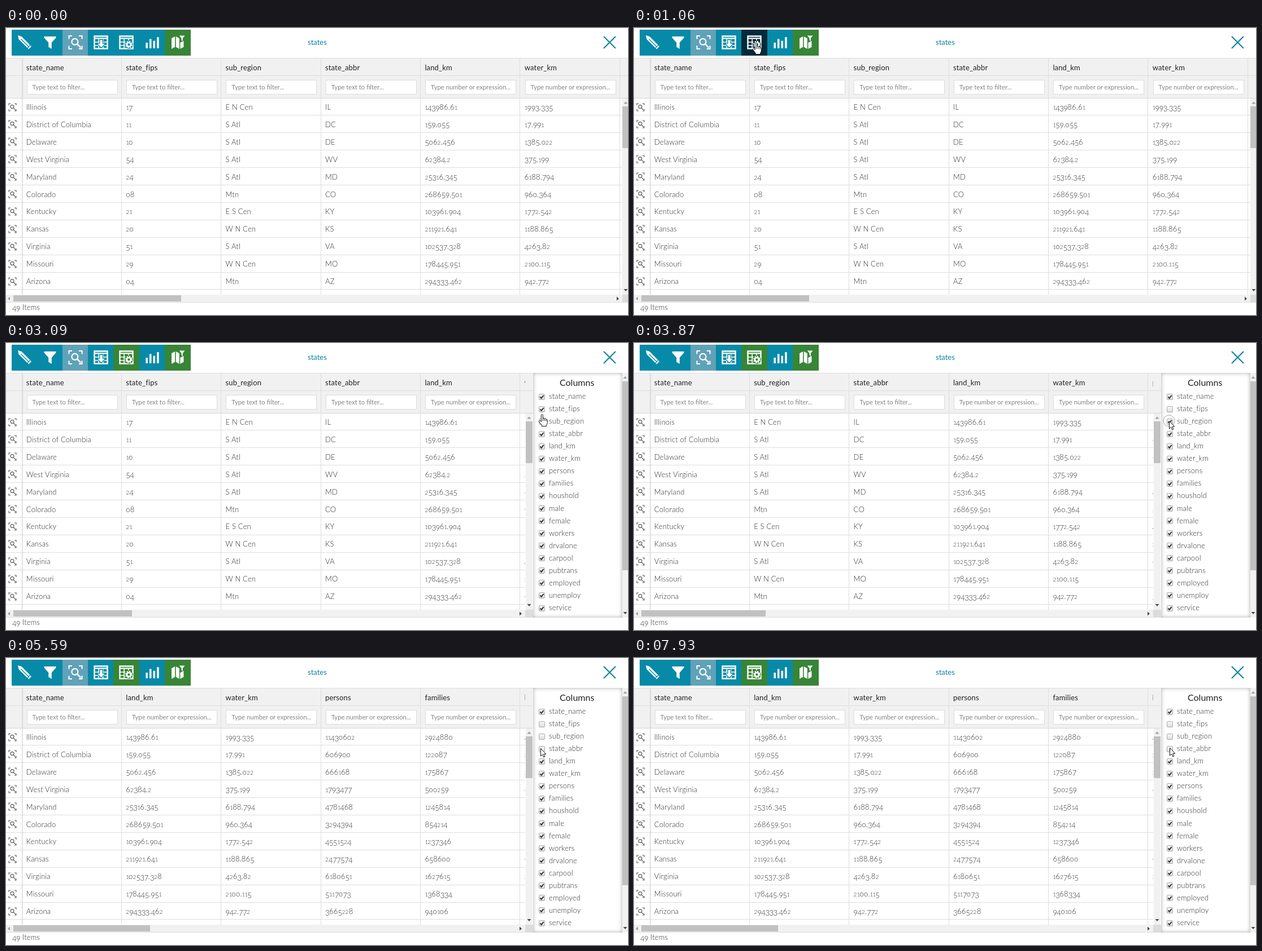
An HTML page for the animation above (8000 ms loop, 1101 by 509 pixels).

```html
<!DOCTYPE html>
<html lang="en">
<head>
<meta charset="utf-8">
<title>states</title>
<style>
html, body { margin: 0; width: 100%; height: 100%; overflow: hidden; background: #fff; }
body { position: relative; font: 13px/31px Lato, "Open Sans", sans-serif; color: #2c2c2c; }
div, svg, i { position: absolute; box-sizing: border-box; white-space: nowrap; }
svg { overflow: visible; fill: none; }
.tool { top: 3px; width: 46px; height: 46px; background: #078aa7; }
.tool svg { left: 0; top: 0; width: 46px; height: 45px; stroke: #fff; stroke-width: 1.9; }
.title { left: 534px; top: 10px; color: #0a82a0; }
#grid { left: 0; top: 53px; width: 1101px; height: 434px; overflow: hidden; border-top: 1px solid #ddd; }
#head { left: 0; top: 0; width: 100%; height: 71px; background: #f1f1f1; border-bottom: 1px solid #d6d6d6; }
#head::after { content: ""; position: absolute; left: 0; top: 30px; width: 100%; height: 1px; background: #ddd; }
#view { left: 0; top: 0; width: 1091px; height: 419px; overflow: hidden; }
.gutter { left: 0; top: 0; width: 29px; height: 419px; border-right: 1px solid #d4d4d4; box-shadow: 1px 0 2px rgba(0, 0, 0, .08); }
.col { top: 0; width: 176.4px; height: 419px; border-right: 1px solid #ddd; }
.col b { position: absolute; left: 7.3px; top: 1px; font-weight: 400; color: #222; letter-spacing: .15px; }
.box { left: 8px; top: 38px; width: 161px; height: 26px; padding-left: 9px; background: #fff; border: 1px solid #dcdcdc;
  font: 11.25px/24px Lato, "Open Sans", sans-serif; color: #858585; }
.cell { left: 7.3px; height: 30.9px; line-height: 31px; }
.cell, .opt, #count { font-weight: 300; letter-spacing: .17px; }
.line { left: 0; width: 100%; height: 1px; background: #dedede; }
.cell span, #count span { line-height: 0; }
.sm { font-size: 10px; letter-spacing: .3px; }
.one { font-size: 10px; letter-spacing: -1px; }
.low { position: relative; top: 2.6px; letter-spacing: -.5px; }
.mark { left: 4px; width: 15px; height: 15px; stroke: #555; stroke-width: 1.1; }
.bar { background: #f1f1f1; }
.bar i { background: #c1c1c1; }
.bar svg { left: 0; top: 0; width: 1px; height: 1px; }
#vbar { top: 71px; width: 12px; height: 348px; }
#vbar i { left: 0; top: 14px; width: 100%; height: 74px; }
#hbar { left: 0; top: 419px; height: 14px; }
#hbar::after { content: ""; position: absolute; right: 0; top: 0; width: var(--corner); height: 100%; background: #dcdcdc; }
#hbar i { left: 13px; top: 1px; height: 11px; }
.foot { left: 0; top: 486px; width: 100%; height: 1px; background: #ddd; }
#count { left: 11px; top: 480px; }
#panel { left: 933px; top: 53px; width: 168px; height: 434px; overflow: hidden; background: #fff; }
.shade { left: 0; top: 0; width: 158px; height: 434px; box-shadow: inset 0 0 7px rgba(0, 0, 0, .34); }
.head2 { left: 47px; top: 1px; font-size: 16px; color: #222; }
.opt { left: 28px; }
.check { left: 10px; width: 11px; height: 11px; border: 1px solid #a9a9a9; border-radius: 2px; background: linear-gradient(#f7f7f7, #dedede); }
.check svg { left: -1px; top: -1px; width: 11px; height: 11px; stroke: #333; stroke-width: 2; }
#pbar { left: 158px; top: 0; width: 10px; height: 434px; }
#pbar i { left: 0; top: 15px; width: 10px; height: 335px; }
#ring { width: 21px; height: 21px; border-radius: 50%; border: 1.5px solid rgba(110, 110, 110, .6); }
#cursor { left: 0; top: 0; width: 1px; height: 1px; }
#cursor svg { left: 0; top: 0; width: 1px; height: 1px; fill: #fff; stroke: #111; stroke-linejoin: round; }
</style>
</head>
<body>
<div class="title">states</div>
<svg style="left:1058px;top:15px;width:21px;height:21px" stroke="#0a82a0" stroke-width="2"><path d="M0 0 21 21M21 0 0 21"/></svg>
<div id="grid">
  <div id="head"></div>
  <div id="view"></div>
  <div id="vbar" class="bar"><i></i></div>
  <div id="hbar" class="bar"><i></i></div>
</div>
<div class="foot"></div>
<div id="count"></div>
<div id="panel">
  <div class="shade"></div>
  <div class="head2">Columns</div>
  <div id="pbar" class="bar"><i></i></div>
</div>
<script>
const LOOP = 8000, PITCH = 176.4, ROW = 30.9, TOP = 71;
const TEAL = [7, 138, 167], DARK = [0, 43, 57], GREEN = [55, 133, 54];
const $ = id => document.getElementById(id);

function add(parent, cls, html = '', style = '') {
  const el = document.createElement('div');
  el.className = cls;
  el.innerHTML = html;
  el.style.cssText = style;
  parent.append(el);
  return el;
}
const svg = (body, attrs = '') => `<svg ${attrs}>${body}</svg>`;
const path = (d, attrs = '') => `<path d="${d}" ${attrs}/>`;
const solid = 'fill="#fff" stroke="none"';

// Old-style figures: small 0 1 2, lowered 3 4 5 7 9
const figures = s => s.replace(/\d/g, d =>
  d === '0' ? '<span>o</span>' :
  d === '1' ? '<span class="one">1</span>' :
  d === '2' ? '<span class="sm">2</span>' :
  '68'.includes(d) ? d : `<span class="low">${d}</span>`);

// Toolbar
const brackets = 'M12 17V12H17M28 12H33V17M33 28V33H28M17 33H12V28';
const sheet = path('M12 12.5H33V32.5H12ZM12 16H33', 'stroke-width="2.2"') +
  path('M12 22H33M12 27.5H33M19 17V32M26 17V32', 'stroke-width="1.5"');
const backing = '<circle cx="26.5" cy="26" r="6.8" stroke="none"/>';
const gear = '<circle cx="26.5" cy="26" r="3.3" stroke-width="2.6"/>' +
  '<circle cx="26.5" cy="26" r="5.1" stroke-width="1.8" stroke-dasharray="2 2"/>';
const icons = [
  path('M11.500 11 17.5 13 33.5 29 29 33.500 13 17.500Z', solid) +
    path('M16.500 17 29.500 30M26.500 32 32 26.500', 'stroke="#078aa7" stroke-width="1.2"'),
  path('M13 13H32V15L25 23V33L20 30V23L13 15Z', solid),
  path(brackets) + '<circle cx="21.5" cy="21.5" r="5"/>' + path('M25 25 31 31', 'stroke-width="2.4"'),
  sheet + path('M20.500 18H25.500V24H30L23 31.500 16 24H20.500Z', 'fill="#fff" stroke="#078aa7" stroke-width="1.2"'),
  sheet + backing + gear,
  path('M13.500 23V32M19.500 17V32M25.500 20V32M31.500 14V32', 'stroke-width="3.2"'),
  path('M12.500 16 18 13V30L12.500 33ZM19.500 13 25 16V33L19.500 30ZM26.500 23 32 20V30L26.500 33Z', solid) +
    path('M25 11.500H34L30.500 16V20.500L28.500 19V16Z', solid)
];
const tools = icons.map((body, i) => add(document.body, 'tool', svg(body, 'viewBox="2 2 41 41"'),
  `left:${10 + Math.round(45.1 * i)}px;background:${i === 2 ? '#60a2b8' : i === 6 ? '#378536' : '#078aa7'}`));
const gearTool = tools[4], gearBack = gearTool.querySelector('circle');

// Table
const names = ['state_name', 'state_fips', 'sub_region', 'state_abbr', 'land_km', 'water_km', 'persons', 'families',
  'houshold', 'male', 'female', 'workers', 'drvalone', 'carpool', 'pubtrans', 'employed', 'unemploy', 'service'];
const rows = `Illinois|17|E N Cen|IL|143986.61|1993.335|11430602|2924880|4202240
District of Columbia|11|S Atl|DC|159.055|17.991|606900|122087|249634
Delaware|10|S Atl|DE|5062.456|1385.022|666168|175867|247497
West Virginia|54|S Atl|WV|62384.2|375.199|1793477|500259|688557
Maryland|24|S Atl|MD|25316.345|6188.794|4781468|1245814|1748991
Colorado|08|Mtn|CO|268659.501|960.364|3294394|854214|1282489
Kentucky|21|E S Cen|KY|103961.904|1772.542|4551524|1237346|1718663
Kansas|20|W N Cen|KS|211921.641|1188.865|2477574|658600|944726
Virginia|51|S Atl|VA|102537.328|4263.82|6180651|1627615|2289067
Missouri|29|W N Cen|MO|178445.951|2100.115|5117073|1368334|1961206
Arizona|04|Mtn|AZ|294333.462|942.772|3665228|940106|1368843`.split('\n').map(r => r.split('|'));
rows.forEach(r => r.push(String(Math.round(r[6] * .487))));

const view = $('view');
const glass = path('M1 4V1H4M11 1H14V4M14 11V14H11M4 14H1V11') +
  '<circle cx="7" cy="6.6" r="3"/>' + path('M9.200 8.800 13 12.600');
rows.forEach((r, i) => add(view, 'line', '', `top:${Math.floor(TOP + ROW * (i + 1) - 1)}px`));
const gutter = add(view, 'gutter');
gutter.innerHTML = rows.map((r, i) =>
  svg(glass, `class="mark" style="top:${TOP + ROW * i + 7.5}px"`)).join('');
const cols = names.slice(0, 10).map((name, c) => {
  const hint = c < 4 ? 'Type text to filter...' : 'Type number or expression...';
  const col = add(view, 'col', `<b>${name}</b>`);
  add(col, 'box', hint);
  rows.forEach((r, i) => add(col, 'cell', figures(r[c]), `top:${TOP + ROW * i}px`));
  return col;
});
$('count').innerHTML = figures('49 Items');

// Scrollbar arrows
const tri = (x, y, turn, dark) => path('M-3.500 2H3.500L0-2Z',
  `fill="${dark ? '#4a4a4a' : '#a0a0a0'}" transform="translate(${x} ${y}) rotate(${turn})"`);
const arrows = (bar, body) => bar.insertAdjacentHTML('beforeend', svg(body));
arrows($('vbar'), tri(6, 7.5, 0) + tri(6, 340, 180, 1));
arrows($('hbar'), tri(5, 7, -90) + `<g id="right">${tri(0, 7, 90, 1)}</g>`);
arrows($('pbar'), tri(5, 8, 0) + tri(5, 426, 180, 1));

// Column list
const ticks = names.map((name, i) => {
  const y = 42 + 22.06 * i;
  add($('panel'), 'opt', name, `top:${y - 16}px`);
  const box = add($('panel'), 'check', svg(path('M2.500 5.500 4.700 8 8.700 2.800')), `top:${Math.round(y - 5.5)}px`);
  return box.firstChild;
});

// Pointer
const ring = add(document.body, '');
ring.id = 'ring';
const cursor = add(document.body, '',
  svg(path('M.5.5V14L3.600 11.200 5.800 16 7.900 15 5.700 10.300H9.800Z')) +
  svg(path('M-1.700 1C-1.700-1 1.400-1 1.400 1V7C1.800 5.700 4.200 6 4.300 7.700 5 6.500 7 7 7 8.600 7.800 7.700 9.300 8.300 9.300 9.800V14.500Q9 17 7.500 18.500V20.500H-.8V18.500L-5.300 12.600C-6.400 10.800-4.400 9.800-3.200 11L-1.700 12.600Z') +
    path('M1.400 7V11M4.300 8V11M7 9V11.500')));
cursor.id = 'cursor';
const [arrow, hand] = cursor.children;

const track = [[150, 470, 420], [850, 216, 26], [1400, 216, 26], [2040, 948, 108], [2210, 948, 108], [2310, 950, 114],
  [2960, 950, 114], [3090, 949, 127], [3260, 947, 134], [3400, 947, 134], [3410, 947, 138], [4690, 947, 138],
  [4960, 946, 160], [5850, 946, 160], [6140, 946, 184], [7590, 946, 184], [7930, 948, 159], [LOOP, 948, 159]];
const handTimes = [[780, 1440], [3010, 3180], [4730, 4890], [5920, 6070], [7660, 7860]];
const clicks = [[1230, 1380], [2710, 2860], [3870, 4060], [5210, 5360], [6290, 6370], [7060, 7130]];
const thumbs = [[0, 310], [1540, 223], [3180, 233], [4270, 243], [5590, 255], [6600, 269], [7380, 255]];
const OPEN = 1540;

const within = (list, t) => list.some(([a, b]) => t >= a && t < b);
const ramp = (t, a, b) => Math.min(1, Math.max(0, (t - a) / (b - a)));
const mix = (a, b, k) => a.map((v, i) => v + (b[i] - v) * k);
const show = (el, on) => { el.style.display = on ? '' : 'none'; };

function pointer(t) {
  const i = Math.max(1, track.findIndex(p => p[0] > t));
  const a = track[i - 1], b = track[i], k = ramp(t, a[0], b[0]);
  return mix(a, b, k * k * (3 - 2 * k)).slice(1);
}

function render(t) {
  const open = t >= OPEN;
  const hidden = [false, t >= 3180, t >= 4270, t >= 5590, t >= 6600 && t < 7380];

  let slot = 0;
  cols.forEach((col, i) => {
    show(col, !hidden[i]);
    if (!hidden[i]) col.style.left = 28.5 + PITCH * slot++ + 'px';
  });
  ticks.forEach((tick, i) => show(tick, !hidden[i]));

  const hbar = $('hbar'), width = open ? 933 : 1101, inner = open ? 919 : 1091;
  show($('panel'), open);
  $('grid').style.width = hbar.style.width = width + 'px';
  view.style.width = inner + 'px';
  $('vbar').style.left = (open ? 920 : 1091) + 'px';
  hbar.style.setProperty('--corner', width - inner + 'px');
  $('right').setAttribute('transform', `translate(${inner - 8} 0)`);
  const end = thumbs.filter(s => s[0] <= t).pop()[1];
  hbar.firstElementChild.style.width = end - 13 + 'px';

  const color = `rgb(${mix(mix(TEAL, DARK, ramp(t, 860, 1060)), GREEN, ramp(t, OPEN, 1700))})`;
  gearTool.style.background = color;
  gearBack.setAttribute('fill', color);

  const [x, y] = pointer(t), isHand = within(handTimes, t);
  show(cursor, t >= track[0][0]);
  cursor.style.transform = `translate(${x}px, ${y}px)`;
  show(arrow, !isHand);
  show(hand, isHand);
  show(ring, within(clicks, t));
  ring.style.transform = `translate(${x - 10.5}px, ${y - 10.5}px)`;
}

const start = performance.now();
function tick() {
  render((performance.now() - start) % LOOP);
  requestAnimationFrame(tick);
}
tick();
</script>
</body>
</html>
```
